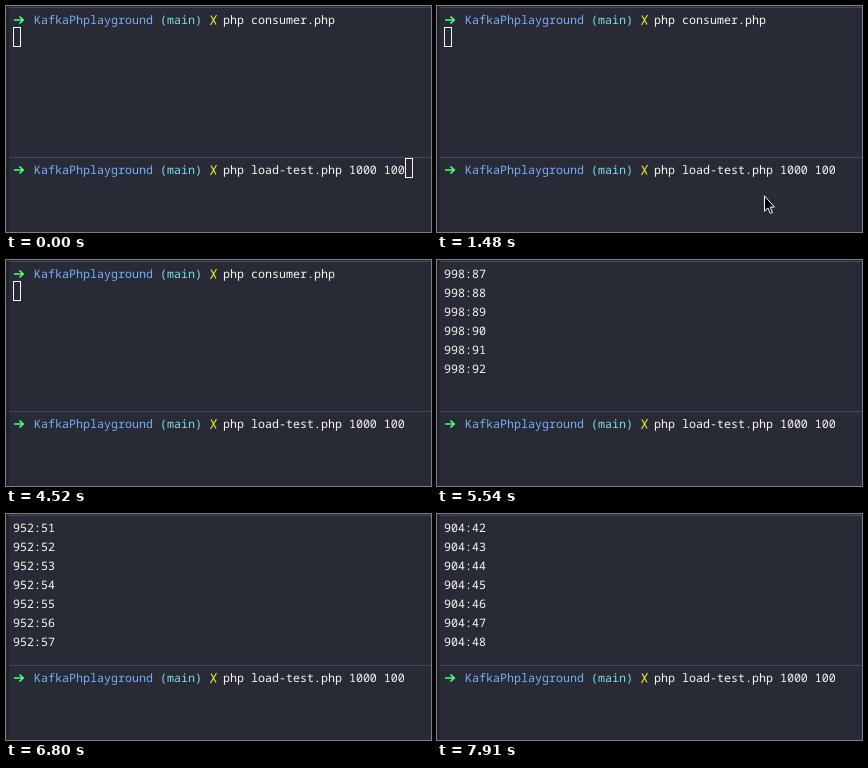
Animation, 425 px wide and 226 px high, one loop 7.99 s. Source, as an HTML page:

```html
<!DOCTYPE html>
<html lang="en">
<head>
<meta charset="utf-8">
<title>Terminal load test</title>
<style>
  html, body { margin: 0; width: 100%; height: 100%; overflow: hidden; background: #282a36; }
  svg { display: block; width: 425px; height: 226px; }
  text {
    font: 11.667px "Noto Sans Mono", "DejaVu Sans Mono", monospace;
    fill: #f8f8f2;
    text-rendering: geometricPrecision;
    white-space: pre;
  }
  .dir { fill: #78aef5; }
  .branch { fill: #7fdcea; }
  .arrow { fill: none; stroke: #50fa7b; stroke-width: 1.7; }
  .cross { fill: none; stroke: #e6e22e; stroke-width: 1.2; }
  .hollow { fill: none; stroke: #f8f8f2; }
  .solid { fill: #f8f8f2; }
</style>
</head>
<body>
<svg viewBox="0 0 425 226">
  <defs>
    <g id="prompt">
      <path class="arrow" d="M8 12H17M13.5 8.5L17.2 12L13.5 15.5"/>
      <text class="dir" x="28" y="16">KafkaPhplayground</text>
      <text class="branch" x="154" y="16">(main)</text>
      <path class="cross" d="M205 7.5L210 16.5M210.5 7L204.5 17"/>
    </g>
  </defs>
  <rect width="425" height="226" fill="#282a36"/>
  <rect width="3" height="226" fill="#21222c"/>
  <path d="M3 1.5H425M3 151.5H425" stroke="#44475a"/>

  <g id="command">
    <use href="#prompt" y="2"/>
    <text x="217" y="18">php consumer.php</text>
  </g>
  <g id="output"></g>
  <rect id="topCursor" class="hollow" width="7" height="19"/>

  <use href="#prompt" y="152"/>
  <text x="217" y="168">php load-test.php 1000 100</text>
  <rect id="idleCursor" class="hollow" x="399.5" y="152.5" width="7" height="19"/>
  <rect id="cursor" class="solid" width="7" height="19"/>
  <path id="mouse" fill="#000" stroke="#fff" d="M.5 .8V16.2L4 12.9L6.3 18.3L8.5 17.4L6.2 12.1H10.4Z"/>
</svg>
<script>
const LOOP = 7990, ROW = 19, CHAR = 7, LEFT = 7, TOP = 2;
const byId = id => document.getElementById(id);
const [command, output, topCursor, idleCursor, cursor, mouse] =
  ['command', 'output', 'topCursor', 'idleCursor', 'cursor', 'mouse'].map(byId);

const FOCUS = 930, ENTER = 2490, OUTPUT = 5540;
const blinks = [FOCUS, 1480, 2030, 3520, 4070, 4520, 5080, OUTPUT, 6030, 6578, 7124, 7620];

// Bursts of screen updates: start, interval, count
const updates = [[OUTPUT, 80, 5], [6180, 75, 3], [6500, 78, 11], [7410, 70, 6], [7910, 0, 1]]
  .flatMap(([start, gap, n]) => Array.from({ length: n }, (_, i) => start + i * gap));
// 6/7: rows shown, c: six rows and cursor below, e: seven rows and cursor at the end
const layouts = '6777e' + '77c' + '76777677777' + '77677c' + '7';
// Messages received by a given time
const progress = [[OUTPUT, 92], [6330, 3065], [7280, 6809], [7910, 9448]];

const rows = Array.from({ length: 7 }, (_, i) => {
  const row = document.createElementNS('http://www.w3.org/2000/svg', 'text');
  row.setAttribute('x', LEFT);
  row.setAttribute('y', TOP + 16 + i * ROW);
  return output.appendChild(row);
});

const show = (el, on) => el.style.display = on ? '' : 'none';
const place = (el, x, y) => el.setAttribute('transform', `translate(${x} ${y})`);
const message = n => `${998 - Math.floor((n - 1) / 100)}:${(n - 1) % 100 + 1}`;

function received(t) {
  const i = progress.findIndex(([time]) => t <= time);
  if (i < 1) return progress[0][1];
  const [[t0, n0], [t1, n1]] = [progress[i - 1], progress[i]];
  return Math.round(n0 + (n1 - n0) * (t - t0) / (t1 - t0));
}

function drawTop(t) {
  const step = updates.filter(time => time <= t).length - 1;
  const running = step < 0;
  show(command, running);
  show(output, !running);
  if (running) {
    show(topCursor, true);
    place(topCursor, LEFT + .5, TOP + ROW + .5);
    return;
  }
  const layout = layouts[step];
  const count = '6c'.includes(layout) ? 6 : 7;
  const last = received(updates[step]);
  rows.forEach((row, i) => row.textContent = i < count ? message(last - count + 1 + i) : '');
  show(topCursor, 'ce'.includes(layout));
  const col = layout === 'e' ? message(last).length : 0;
  place(topCursor, LEFT + col * CHAR + .5, TOP + 6 * ROW + .5);
}

function drawBottom(t) {
  show(idleCursor, t < FOCUS);
  show(cursor, blinks.filter(time => time <= t).length % 2);
  if (t < ENTER) place(cursor, 399, 152);
  else place(cursor, LEFT, 171);
}

function drawMouse(t) {
  show(mouse, t >= 450 && t < 3040);
  if (t >= 2960) place(mouse, 356, 200);
  else if (t >= 1180) place(mouse, 327, 189);
  else {
    const k = Math.min(7, Math.max(0, Math.floor((t - 450) / 80))) / 7;
    const ease = 1 - (1 - k) ** 2;
    place(mouse, Math.round(324 + 12 * ease), Math.round(221 - 33 * ease));
  }
}

const start = performance.now();
function frame() {
  const t = (performance.now() - start) % LOOP;
  drawTop(t);
  drawBottom(t);
  drawMouse(t);
  requestAnimationFrame(frame);
}
frame();
</script>
</body>
</html>
```
